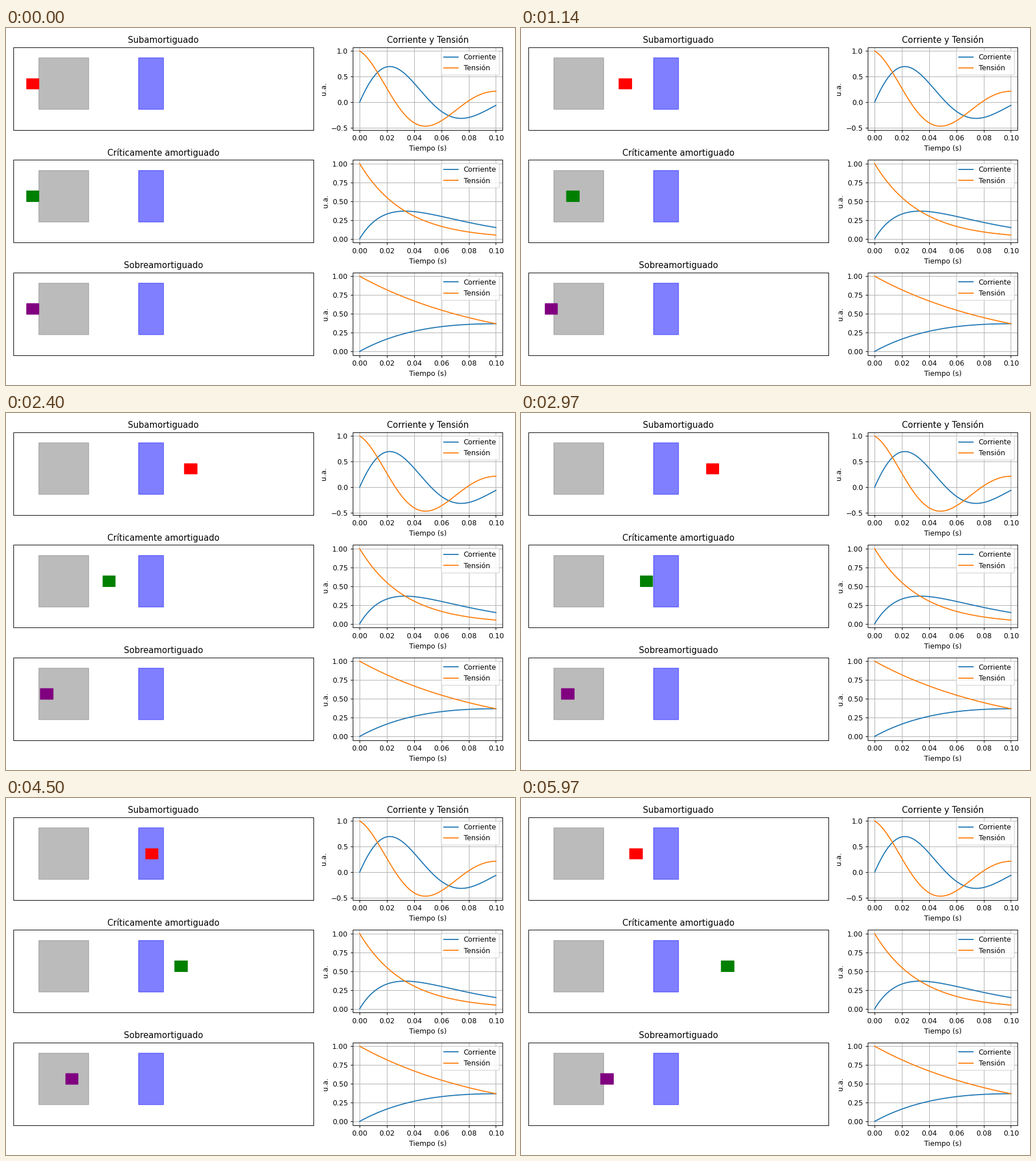
A matplotlib script that plays this animation: 894x626 px, repeating every 6000 ms.

```python
import numpy as np
import matplotlib.pyplot as plt
from matplotlib.animation import FuncAnimation
from matplotlib.patches import Rectangle
from matplotlib.transforms import Affine2D

DPI = 89.4
FRAMES, INTERVAL = 200, 30

# Layout in hundredths of an inch, measured from the top left.
WIDTH, HEIGHT = 1000, 700.22372
LEFT, UNIT = 15, 49.08
TOP, PITCH, ROW_H = 37.78, 220.85, 162.2
PLOT_X, PLOT_W = 681.4, 294.5

t = np.linspace(0, 0.1, FRAMES)


def damped(a):
    """Current, voltage and travel for a repeated root a."""
    decay = np.exp(-a * t)
    return a * t * decay, decay, 9 * (1 - (1 + a * t) * decay)


def ringing(a, w):
    """Current, voltage and travel for an oscillating discharge."""
    decay = np.exp(-a * t)
    voltage = decay * np.cos(w * t)
    return decay * np.sin(w * t), voltage, 4.5 * (1 - voltage)


def snap(v):
    return np.floor(v + 0.5) + 0.5


def col(x):
    return snap(LEFT + x * UNIT)


def place(x, y, w, h):
    return [x / WIDTH, 1 - (y + h) / HEIGHT, w / WIDTH, h / HEIGHT]


rows = [
    ("Subamortiguado", "red", ringing(15, 60)),
    ("Críticamente amortiguado", "green", damped(30)),
    ("Sobreamortiguado", "purple", damped(10)),
]

fig = plt.figure(figsize=(WIDTH / 100, HEIGHT / 100), dpi=DPI,
                 facecolor="white")
layout = (Affine2D().scale(0.01, -0.01).translate(0, HEIGHT / 100)
          + fig.dpi_scale_trans)


def block(ax, top, x, w, low, high, **style):
    """Rectangle on a track whose height spans -2 to 2."""
    y0, y1 = (snap(top + (2 - v) * ROW_H / 4) for v in (high, low))
    return ax.add_patch(Rectangle((col(x), y0), col(x + w) - col(x), y1 - y0,
                                  transform=layout, snap=False, **style))


slugs = []
for k, (title, color, (current, voltage, travel)) in enumerate(rows):
    top = TOP + PITCH * k

    track = fig.add_axes(place(LEFT, top, 12 * UNIT, ROW_H))
    track.set(xlim=(0, 12), ylim=(-2, 2), xticks=[], yticks=[], title=title)
    block(track, top, 1, 2, -1, 1.5, color="#797979", alpha=0.5)
    block(track, top, 5, 1, -1, 1.5, color="blue", alpha=0.5)
    slug = block(track, top, 0.5, 0.5, 0, 0.5, color=color)
    slugs.append((slug, 0.5 + travel))

    plot = fig.add_axes(place(PLOT_X, top, PLOT_W, ROW_H))
    plot.plot(t, current, label="Corriente")
    plot.plot(t, voltage, label="Tensión")
    plot.set(xlabel="Tiempo (s)", ylabel="u.a.")
    if k == 0:
        plot.set_title("Corriente y Tensión")
    plot.grid(True)
    plot.legend(loc="upper right")


def update(n):
    for slug, path in slugs:
        left, right = col(path[n]), col(path[n] + 0.5)
        slug.set_x(left)
        slug.set_width(right - left)
    return [slug for slug, _ in slugs]


anim = FuncAnimation(fig, update, frames=FRAMES, interval=INTERVAL,
                     repeat=True, repeat_delay=0, blit=True)
plt.show()
```
